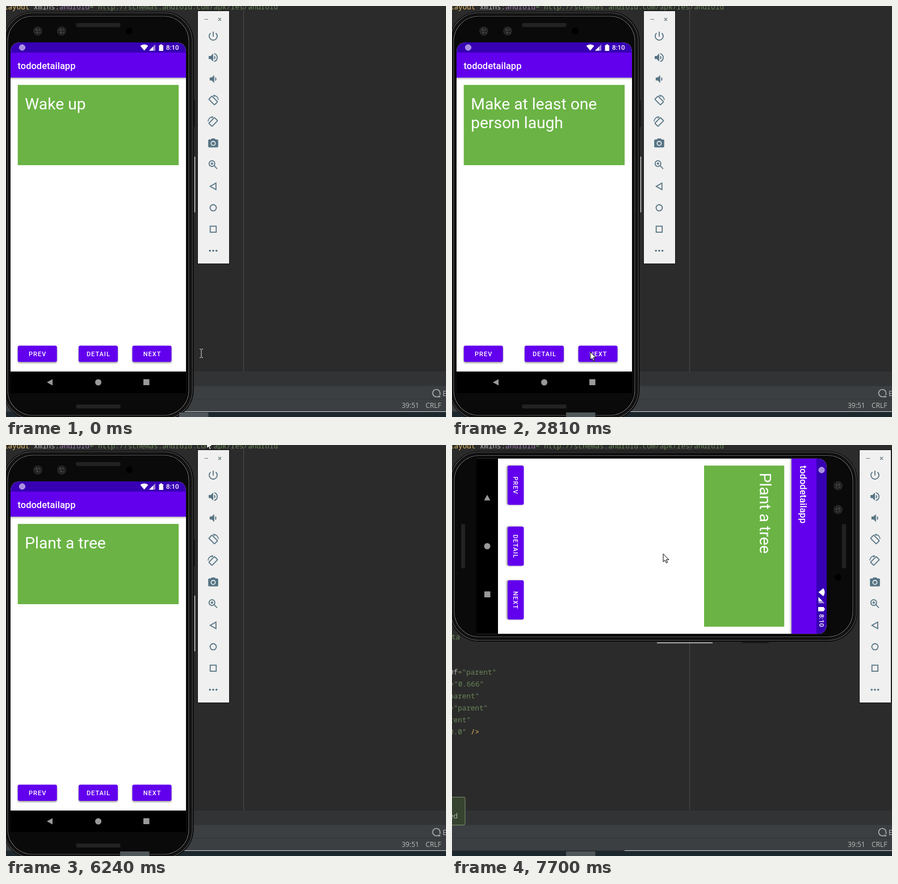
Write an HTML page that moves like this. It is 775 px wide and 723 px high and loops after 8000 ms.

```html
<!DOCTYPE html>
<html lang="en">
<head>
<meta charset="utf-8">
<style>
html, body { margin: 0; width: 100%; height: 100%; overflow: hidden; background: #2b2b2b; }
svg { display: block; }
text { white-space: pre; }
.code { font: 12.58px "Noto Sans Mono", monospace; fill: #6a8759; }
.bar { font: 12px "Open Sans", sans-serif; fill: #bbb; }
.phone text { font-family: Roboto, sans-serif; fill: #fff; }
.label { font-size: 11px; font-weight: 500; letter-spacing: 1px; text-anchor: middle; }
.line { fill: none; stroke: #567484; stroke-width: 2; }
</style>
</head>
<body>
<svg width="775" height="723" viewBox="0 0 775 723">
  <defs>
    <filter id="blur" x="-20%" y="-50%" width="140%" height="220%"><feGaussianBlur stdDeviation="1.5"/></filter>
    <clipPath id="screen"><path d="M8 681V82q0-18 18-18H299q18 0 18 18V681z"/></clipPath>
    <clipPath id="nextClip"><rect x="222.500" y="597.500" width="69" height="28.500" rx="3"/></clipPath>
    <linearGradient id="fade" x2="0" y2="1"><stop stop-opacity=".3"/><stop offset="1" stop-opacity="0"/></linearGradient>
  </defs>

  <!-- editor -->
  <rect width="775" height="723" fill="#2b2b2b"/>
  <path d="M418.500 0V643" stroke="#4b4b4b"/>
  <text class="code" x="-4" y="6"><tspan fill="#e8bf6a">layout </tspan><tspan fill="#bababa">xmlns:</tspan><tspan fill="#9876aa">android</tspan>="http://schemas.android.com/apk/res/android</text>
  <g id="code" class="code" text-anchor="end"></g>
  <rect y="643" width="775" height="26" fill="#313335"/>
  <rect y="668.500" width="775" height="45" fill="#3c3f41"/>
  <path d="M0 691.500H775" stroke="#323435"/>
  <path d="M764 687.500H758.500A6.500 6.500 0 1 1 764.500 681V684.500M762 685.500L765 688" fill="none" stroke="#afb1b3" stroke-width="1.600"/>
  <g class="bar"><text x="769" y="686">Event Log</text><text x="697" y="707">39:51</text><text x="739" y="707">CRLF</text></g>
  <rect y="714" width="775" height="9" fill="#1c272e"/>
  <path d="M304 713.500H775" stroke="#d4d6d7" stroke-width="1.200"/>
  <g id="toast"><rect x="-9.500" y="619.500" width="32.500" height="49" rx="2" fill="#35432f" stroke="#7c8f6c"/><text class="bar" x="10" y="657" text-anchor="end">ed</text></g>

  <g id="phone" class="phone">
    <path d="M332 166V213" stroke="#151515" stroke-width="2"/>
    <path d="M332.500 265V363" stroke="#c9c9c9" stroke-width="1.500"/>
    <rect x="-5" y="10" width="335.500" height="718" rx="52" fill="#050505"/>
    <g fill="none">
      <rect x="-3" y="12" width="331" height="714" rx="50" stroke="#484848" stroke-width="1.500"/>
      <rect x="0" y="15" width="325" height="708" rx="47" stroke="#171717" stroke-width="2"/>
      <rect x="3" y="18" width="319" height="702" rx="44" stroke="#626262" stroke-width="1.200"/>
    </g>
    <rect x="5" y="20" width="315" height="698" rx="42" fill="#0a0a0a"/>
    <g fill="#222"><rect x="123.500" y="30" width="78" height="7" rx="2"/><rect x="123.500" y="701" width="78" height="7" rx="2"/></g>
    <g fill="#252525"><circle cx="56" cy="44" r="8"/><circle cx="98" cy="44" r="8"/></g>
    <path d="M53 41l2 2m3-2l1 1m-5 5l2-1m3 1h1M95 41l2 2m3-2l1 1m-5 5l2-1m3 1h1" stroke="#666" stroke-width="1.500"/>
    <circle cx="217" cy="44" r="6" fill="#000"/>
    <g clip-path="url(#screen)">
      <rect x="8" y="64" width="309" height="617" fill="#fff"/>
      <rect x="8" y="126" width="309" height="4" fill="url(#fade)"/>
      <rect x="8" y="64" width="309" height="18.500" fill="#3700b3"/>
      <rect x="8" y="82" width="309" height="44" fill="#6200ee"/>
      <rect x="8" y="643" width="309" height="38" fill="#000"/>
    </g>
    <circle cx="28.500" cy="73" r="5" fill="#a78de0" stroke="#c3b2ea"/>
    <path d="M236.500 70q7-5 14 0l-7 8.500zM269.500 69h2v-1.500h3.500V69h2v10h-7.500z" fill="#fff"/>
    <path d="M252 78.500L263 67.500V78.500z" fill="#a58bdc"/><path d="M252 78.500L259 71.500V78.500z" fill="#fff"/>
    <text x="282" y="77" font-size="11.500" font-weight="500">8:10</text>
    <text x="20.500" y="111" font-size="16.500" font-weight="500">tododetailapp</text>
    <rect x="20.700" y="138.800" width="283.400" height="141.200" fill="#6ab344"/>
    <g font-size="28.200"><text id="todo1" x="33.300" y="182"></text><text id="todo2" x="33.300" y="215"></text></g>
    <rect id="lift" x="223" y="601" width="68" height="31" rx="3" filter="url(#blur)" opacity="0"/>
    <g id="buttons"></g>
    <g clip-path="url(#nextClip)"><circle id="ripple" cx="246" cy="611" fill="#fff"/></g>
    <text class="label" x="257.500" y="616">NEXT</text>
    <path d="M72 662L82 656.500V667.500zM242 656.500h10.500v10.500H242z" fill="#9a9a9a"/><circle cx="162.500" cy="662" r="5.500" fill="#9a9a9a"/>
  </g>
  <rect id="task" y="715" width="51.500" height="8" fill="#50575a"/>

  <g id="panel">
    <rect x="337.500" y="8.500" width="56" height="445" fill="#f0f0f0" stroke="#151515"/>
    <path d="M349.500 23.500H356M374 21L379 26M379 21L374 26" stroke="#6d7b83" stroke-width="1.200"/>
    <rect id="press" x="349" y="179" width="35" height="40" fill="#e2e5e6"/>
    <g id="icons" fill="#567484"></g>
  </g>

  <g id="cursor">
    <path id="arrow" d="M.500 .500V14.500L3.700 11.500 6 16.500 8.200 15.500 6 10.700H10.500z" fill="#fff" stroke="#000"/>
    <path id="beam" d="M-3 -7.500H-1L0 -6.500 1 -7.500H3M0 -6.500V6.500M-3 7.500H-1L0 6.500 1 7.500H3" fill="none" stroke="#e0e0e0"/>
  </g>
</svg>
<script>
const $ = id => document.getElementById(id);
const show = (id, on) => $(id).setAttribute('display', on ? 'inline' : 'none');
const set = (id, attrs) => { for (const k in attrs) $(id).setAttribute(k, attrs[k]); };
const clamp = v => Math.max(0, Math.min(1, v));

const lines = [['ta', 14, 342], ['<tspan fill="#bababa">Of</tspan>="parent"', 78, 404], ['="0.666"', 56, 425],
  ['parent"', 48, 446], ['="parent"', 63, 467], ['rent"', 33, 488], ['0.0"<tspan fill="#e8bf6a"> /&gt;</tspan>', 48, 509]];
$('code').innerHTML = lines.map(([s, x, y]) => `<text x="${x}" y="${y}">${s}</text>`).join('');

$('buttons').innerHTML = [['PREV', 20.7], ['DETAIL', 127.9], ['', 222.5]].map(([s, x]) =>
  `<rect x="${x}" y="599.500" width="69" height="28.500" rx="3" opacity=".4" filter="url(#blur)"/>
   <rect x="${x}" y="597.500" width="69" height="28.500" rx="3" fill="#6200ee"/>
   <text class="label" x="${x + 35}" y="616">${s}</text>`).join('');

const rotate = `<g class="line"><rect x="4" y="7.500" width="16" height="9" rx="1" transform="rotate(45 12 12)"/>
  <path d="M12 1.500Q21 2 22.500 11M12 1.500l3 3" stroke-width="1.600"/></g>`;
const icons = [
  '<path d="M13 3h-2v10h2zm4.830 2.170l-1.420 1.420A6.920 6.920 0 0 1 19 12a7 7 0 1 1-11.420-5.420L6.170 5.170A8.930 8.930 0 0 0 3 12a9 9 0 0 0 18 0c0-2.740-1.230-5.180-3.170-6.830z"/>',
  '<path d="M3 9v6h4l5 5V4L7 9zm13.500 3A4.500 4.500 0 0 0 14 7.970v8.050A4.500 4.500 0 0 0 16.500 12zM14 3.230v2.060a7 7 0 0 1 0 13.420v2.060a9 9 0 0 0 0-17.540z"/>',
  '<path d="M5 9v6h4l5 5V4L9 9zM18.500 12A4.500 4.500 0 0 0 16 7.970v8.050A4.500 4.500 0 0 0 18.500 12z"/>',
  rotate,
  `<g transform="matrix(-1 0 0 1 24 0)">${rotate}</g>`,
  '<path d="M9 2L7.170 4H4a2 2 0 0 0-2 2v12a2 2 0 0 0 2 2h16a2 2 0 0 0 2-2V6a2 2 0 0 0-2-2h-3.170L15 2zm3 15a5 5 0 1 1 0-10 5 5 0 0 1 0 10z"/><circle cx="12" cy="12" r="3.200"/>',
  '<g class="line"><circle cx="9.500" cy="9.500" r="5.700"/><path d="M14 14l6 6M9.500 7v5M7 9.500h5"/></g>',
  '<path class="line" d="M6 12L17.500 5.500V18.500z" stroke-width="1.700"/>',
  '<circle class="line" cx="12" cy="12" r="6.200"/>',
  '<path class="line" d="M6 6H18V18H6z"/>',
  '<circle cx="5.500" cy="12" r="2"/><circle cx="12" cy="12" r="2"/><circle cx="18.500" cy="12" r="2"/>'
];
$('icons').innerHTML = icons.map((s, i) =>
  `<g transform="translate(354.400 ${42.4 + i * 37.75}) scale(.88)">${s}</g>`).join('');

// pointer: time, x, y
const track = [[70, 344, 611], [300, 300, 597], [730, 243, 608], [4540, 243, 608], [4800, 213, 631], [5000, 172, 633],
  [5200, 188, 600], [5390, 207, 564], [5530, 283, 479], [5700, 283, 479], [6070, 352, -8], [6170, 352, -8],
  [6240, 353, -8.5], [7010, 371, 190], [7090, 371.5, 191]];
const todos = [['Wake up', ''], ['Drink Coffee', ''], ['Make at least one', 'person laugh'], ['Plant a tree', '']];
const clicks = [960, 2050, 3280];

function pointer(t) {
  const i = track.findIndex(p => p[0] > t);
  if (i === 0) return track[0].slice(1);
  if (i < 0) return track.at(-1).slice(1);
  const [a, b] = [track[i - 1], track[i]], k = (t - a[0]) / (b[0] - a[0]);
  return [a[1] + (b[1] - a[1]) * k, a[2] + (b[2] - a[2]) * k];
}

function draw(t) {
  const [x, y] = pointer(t), turned = t >= 7550;
  const overEditor = t < 730 && x > 331;
  set('cursor', { transform: `translate(${x} ${y})` });
  show('beam', overEditor);
  show('arrow', !overEditor);

  const [first, second] = todos[clicks.filter(c => t >= c + 80).length];
  $('todo1').textContent = first;
  $('todo2').textContent = second;

  const since = t - (clicks.findLast(c => t >= c) ?? -9999);
  set('ripple', { r: 8 + 45 * clamp(since / 225), opacity: .22 * clamp((690 - since) / 220) });
  set('lift', { opacity: .3 * clamp(since / 100) * clamp((400 - since) / 100) });

  set('task', { x: t < 960 ? 305 : 201 });
  show('press', t >= 7320 && t < 7470);
  set('phone', { transform: turned ? 'matrix(0 1 -1 0 724 15.5)' : '' });
  set('panel', { transform: turned ? 'translate(380)' : '' });
  show('code', turned);
  show('toast', turned);
}

const start = performance.now();
function tick() {
  draw((performance.now() - start) % 8000);
  requestAnimationFrame(tick);
}
tick();
</script>
</body>
</html>
```
